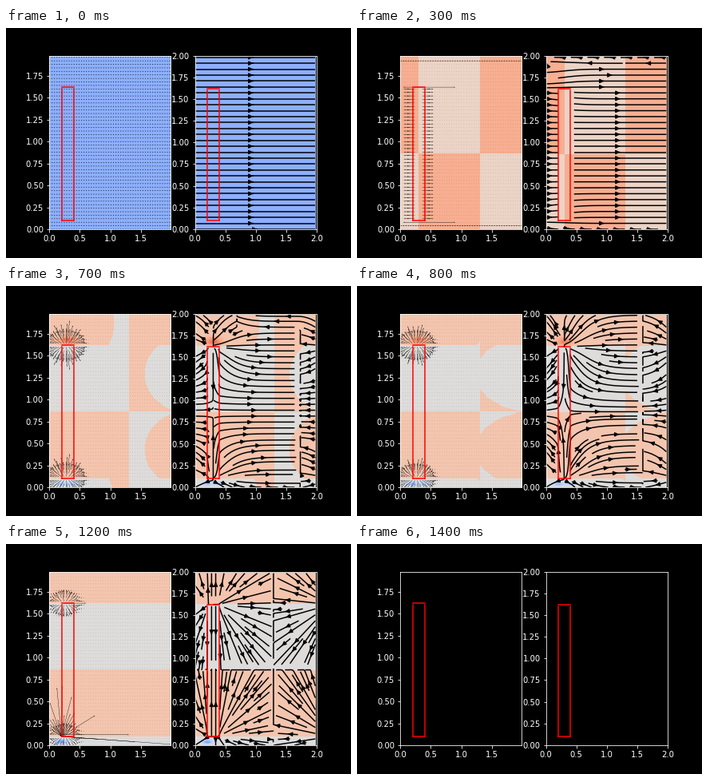
A matplotlib script for the animation above (2.26 s loop, 432x288 px).

```python
import numpy as np
import matplotlib.pyplot as plt
from matplotlib.animation import FuncAnimation

plt.style.use("dark_background")

TICK = 20            # ms per drawn frame
STEP = 100           # ms per simulation step
LOOP = 2260
STEPS = 14           # flow steps, followed by an empty picture
SIZE = 1.98
X_MID, Y_MID = 0.3, 0.86     # centre of the obstacle
Y_LOW, Y_TOP = 0.1, 1.62
WALLS = (0.202, 0.4)

axis = np.arange(100) * 0.02
X, Y = np.meshgrid(axis, axis)
QX, QY = X[::2, ::2], Y[::2, ::2]
cells = (np.arange(198) + 0.5) * 0.01
CX, CY = np.meshgrid(cells, cells)


def bump(x, y, cx, cy, sx, sy):
    return np.exp(-((x - cx) / sx) ** 2 - ((y - cy) / sy) ** 2)


def growth(k):
    """Progress from uniform flow (0) to fully radial flow (1)."""
    return np.clip((k - 3) / 7, 0, 1)


def vorticity(k):
    """Colour value between 0 and 1 for every background cell."""
    if k == 0:
        return np.full_like(CX, 0.25)
    t = growth(k)
    top = CY > Y_MID
    east = (CX > X_MID) & (CX < X_MID + 1)
    early = east != top
    late = (CY > Y_TOP) | ((CY > Y_LOW) & ~top)

    # the late pattern spreads sideways from the obstacle, periodic in x
    dist = np.abs((CX - X_MID + 1) % 2 - 1)
    s = np.abs(CY - Y_MID)
    bulge = np.where(s < 0.76, (s - 0.43) / 0.45, (s - 1) / 0.5) ** 2
    reach = (1.3 * t + 9 * t ** 12) * np.sqrt(np.clip(1 - bulge, 0, 1))
    warm = np.where(dist < reach, late, early)

    fade = min(1, np.exp(3 - k))
    value = np.where(warm, 0.62 + 0.075 * fade, 0.5 + 0.06 * fade)
    value += 0.9 * t * (1 - t) * bump(CX, CY, X_MID, 1.67, 0.13, 0.05)
    value -= 0.3 * t * bump(CX, CY, 0.2, 0.04, 0.08, 0.022)
    value -= 0.6 * t * (1 - t) * bump(CX, CY, 0.39, 0.04, 0.08, 0.022)
    return value


def flow(k):
    """Velocity for the streamlines: uniform at first, radial later."""
    if k == 0:
        return np.ones_like(X), np.zeros_like(X)
    t = growth(k)
    wall_stop = k < 6
    dx = np.where(X < 2.3 - t, X - X_MID, X - X_MID - 2)
    if wall_stop:
        dx = np.where(X < X_MID, X_MID - X, dx)
    dy = Y - np.where(Y > Y_MID, Y_TOP, Y_LOW)
    far = np.clip(np.abs(dx) - 0.08, 0, None) + 0.02 * np.abs(dx)
    u = np.sign(dx) * (1 - t + t * far)
    near = np.exp(-(1 - t) * (np.hypot(0.6 * dx, dy) / 0.2) ** 2)
    v = (1 + 8 * t * (1 - t)) * dy * near

    # return current along the upper edge
    if k < 8:
        back = (Y > SIZE - 0.025 * k) & (wall_stop | (X > 0.7))
        u = np.where(back, -np.abs(u), u)
    body = (np.abs(X - X_MID) < 0.11) & (np.abs(Y - Y_MID) < 0.77)
    u[body] *= 0 if wall_stop else 0.15
    if wall_stop:
        v[body] = 0
    return u, v


def long_rays(k):
    """The few long arrows that leave the obstacle's ends: x, y, u, v."""
    if 3 <= k < 7:
        return [(X_MID, y, u, 0) for y in (Y_TOP, 0.08)
                for u in (0.6 * (k - 2), -0.25)]
    if k < 10:
        return []
    rays = [(0.25, Y_TOP, 0.67 - 0.16 * (k - 10), 0)]
    rays += [(0.2, 0.1, 0.6 * n, -0.03 * n) for n in range(1, k - 8)]
    if k >= 12:
        rng = np.random.default_rng(k)
        angle = np.linspace(0.25, 0.85 * np.pi, 16)
        length = rng.uniform(0.2, 0.62, 16)
        rays += [(0.2, Y_LOW, r * np.cos(a), r * np.sin(a))
                 for a, r in zip(angle, length)]
        rays.append((0.2, 0.12, 1.1, 0))
    return rays


def arrows(k):
    """Start points and displacements of the left-hand arrows."""
    u, v = np.zeros_like(QX), np.zeros_like(QX)
    if k == 0:
        u += 0.022
    elif k < 6:
        gap = np.abs(np.abs(QX - X_MID) - 0.1)
        side = 0.14 * min(1, k / 3) * np.exp(-(gap / 0.04) ** 2)
        u += side * np.sign(QX - X_MID) * (np.abs(QY - Y_MID) < 0.76)
        u[np.isclose(QY, 0.04) | np.isclose(QY, 1.92)] = 0.035
    else:
        cx = X_MID - 0.05 * growth(k)
        size = 0.28 * np.exp((7 - k) / 7)
        for cy in (Y_LOW, Y_TOP):
            dx, dy = QX - cx, 2 * (QY - cy)
            pull = size * bump(QX, QY, cx, cy, 0.21, 0.095)
            pull /= np.hypot(dx, dy) + 1e-6
            u += pull * dx
            v += pull * dy
    grid = np.column_stack([a.ravel() for a in (QX, QY, u, v)])
    return np.vstack([grid, np.reshape(long_rays(k), (-1, 4))]).T


def draw_step(k):
    """Draw one step on both axes and return the new artists."""
    before = set(left.get_children() + right.get_children())
    value = vorticity(k)
    for ax in (left, right):
        ax.imshow(value, cmap="coolwarm", vmin=0, vmax=1, origin="lower",
                  extent=(0, SIZE, 0, SIZE), aspect="auto",
                  interpolation="nearest", zorder=0)
    left.quiver(*arrows(k), color="k", angles="xy", scale_units="xy", scale=1)
    right.streamplot(axis, axis, *flow(k), color="k", minlength=0.08)
    after = left.get_children() + right.get_children()
    return [a for a in after if a not in before]


def draw_body(ax):
    style = dict(color="red", lw=1.5, zorder=2.4)
    for x in WALLS:
        ax.plot([x, x], [Y_LOW, 1.6], **style)
    for y in (Y_LOW, Y_TOP):
        ax.plot(WALLS, [y, y], **style)


fig, (left, right) = plt.subplots(1, 2, figsize=(6, 4), dpi=72)
fig.subplots_adjust(left=0.125, right=0.9, bottom=0.125, top=0.88, wspace=0.2)
steps = [draw_step(k) for k in range(STEPS)]
for ax, end in ((left, SIZE), (right, 2)):
    draw_body(ax)
    ax.set(xlim=(0, end), ylim=(0, end))


def update(i):
    now = i * TICK // STEP
    for k, group in enumerate(steps):
        for artist in group:
            artist.set_visible(k == now)
    return []


anim = FuncAnimation(fig, update, frames=LOOP // TICK, interval=TICK,
                     repeat=True, repeat_delay=0)
plt.show()
```
